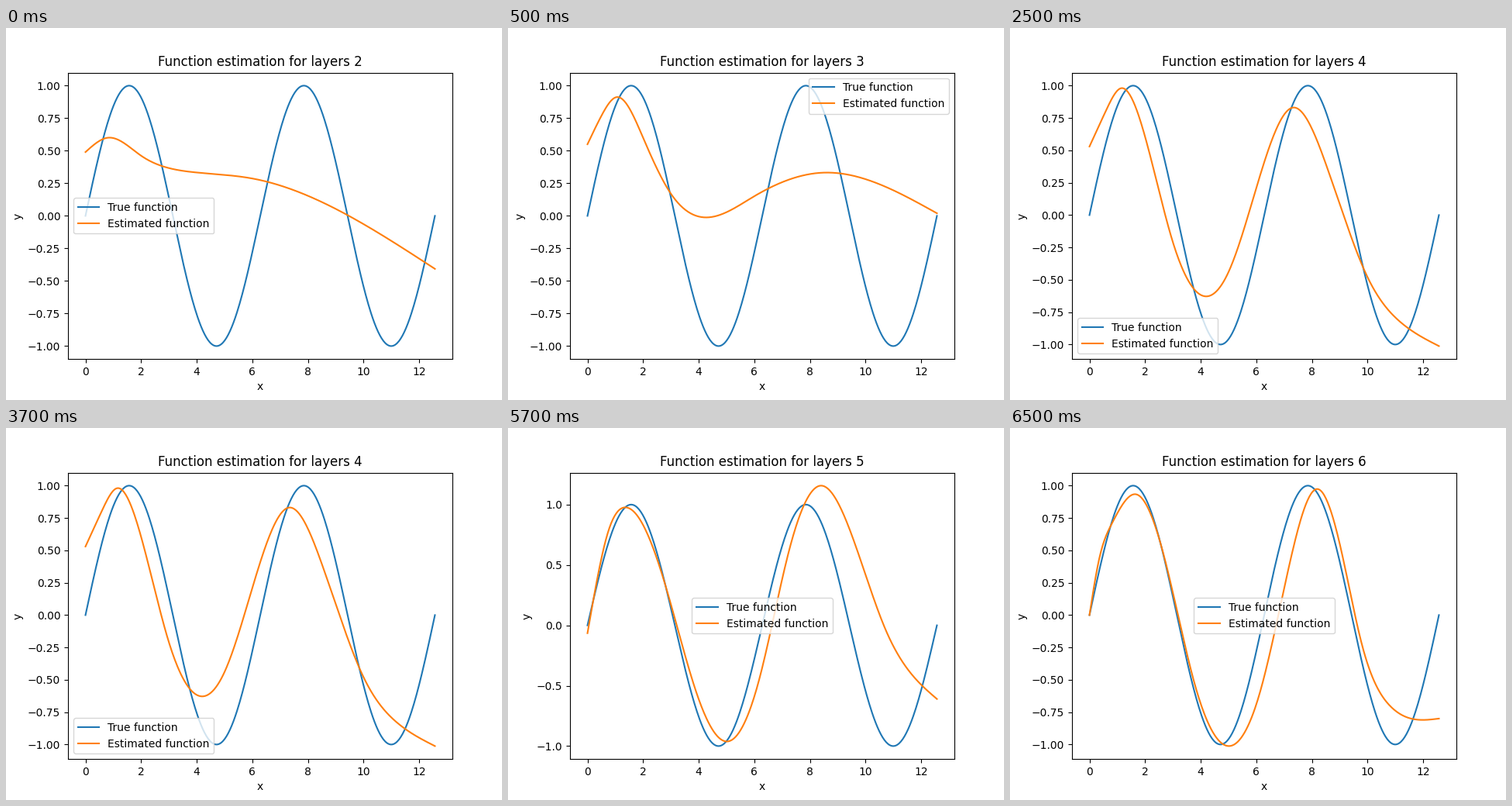
Write a matplotlib script that moves like this. It is 640 px wide and 480 px high and loops after 8000 ms.

```python
import numpy as np
import matplotlib.pyplot as plt
from matplotlib.animation import FuncAnimation

STEP_MS = 500
X_END = 4 * np.pi
X = np.linspace(0, X_END, 400)

# layers: (steps on screen, legend place, key points of the estimate)
STAGES = {
    2: (1, "center left",
        [(0, .49), (.8, .6), (2, .462), (3, .367), (4, .333), (6, .287),
         (8, .154), (X_END, -.407)]),
    3: (4, "upper right",
        [(0, .55), (.5, .768), (1.05, .912), (2, .6), (3, .17), (4.25, -.012),
         (6, .151), (8.5, .332), (10.5, .243), (X_END, .02)]),
    4: (4, "lower left",
        [(0, .53), (.6, .81), (1.13, .98), (2, .605), (3, -.21), (4.17, -.628),
         (5, -.44), (6, .21), (7.3, .83), (8.5, .395), (10, -.48),
         (11.2, -.83), (X_END, -1.012)]),
    5: (4, "center",
        [(0, -.065), (.75, .78), (1.36, .977), (2.1, .785), (2.9, .255),
         (3.9, -.545), (5.02, -.962), (6.15, -.47), (7.25, .62), (8.4, 1.157),
         (9.5, .75), (10.7, -.025), (X_END, -.61)]),
    6: (3, "center",
        [(0, 0), (.35, .435), (.8, .705), (1.68, .933), (2.6, .52), (3.8, -.545),
         (4.98, -1.012), (6.1, -.62), (7.2, .4), (8.18, .974), (9, .55),
         (9.8, -.23), (10.8, -.7), (X_END, -.8)]),
}
TIMELINE = [layers for layers, stage in STAGES.items() for _ in range(stage[0])]


def smooth_curve(points):
    """Natural cubic spline through the key points, sampled at X."""
    knots, values = np.transpose(points)

    def cubic(x):
        return np.abs(x[:, None] - knots) ** 3

    def linear(x):
        return np.column_stack([np.ones_like(x), x])

    tail = linear(knots)
    system = np.block([[cubic(knots), tail], [tail.T, np.zeros((2, 2))]])
    weights = np.linalg.solve(system, np.append(values, [0, 0]))
    return np.hstack([cubic(X), linear(X)]) @ weights


fig, ax = plt.subplots(figsize=(6.4, 4.8), dpi=100)


def draw(step):
    layers = TIMELINE[step]
    _, place, points = STAGES[layers]
    ax.clear()
    ax.plot(X, np.sin(X), label="True function")
    ax.plot(X, smooth_curve(points), label="Estimated function")
    ax.set(title=f"Function estimation for layers {layers}", xlabel="x", ylabel="y")
    ax.legend(loc=place)


anim = FuncAnimation(fig, draw, frames=len(TIMELINE), interval=STEP_MS,
                     init_func=lambda: None, repeat=True)
plt.show()
```
